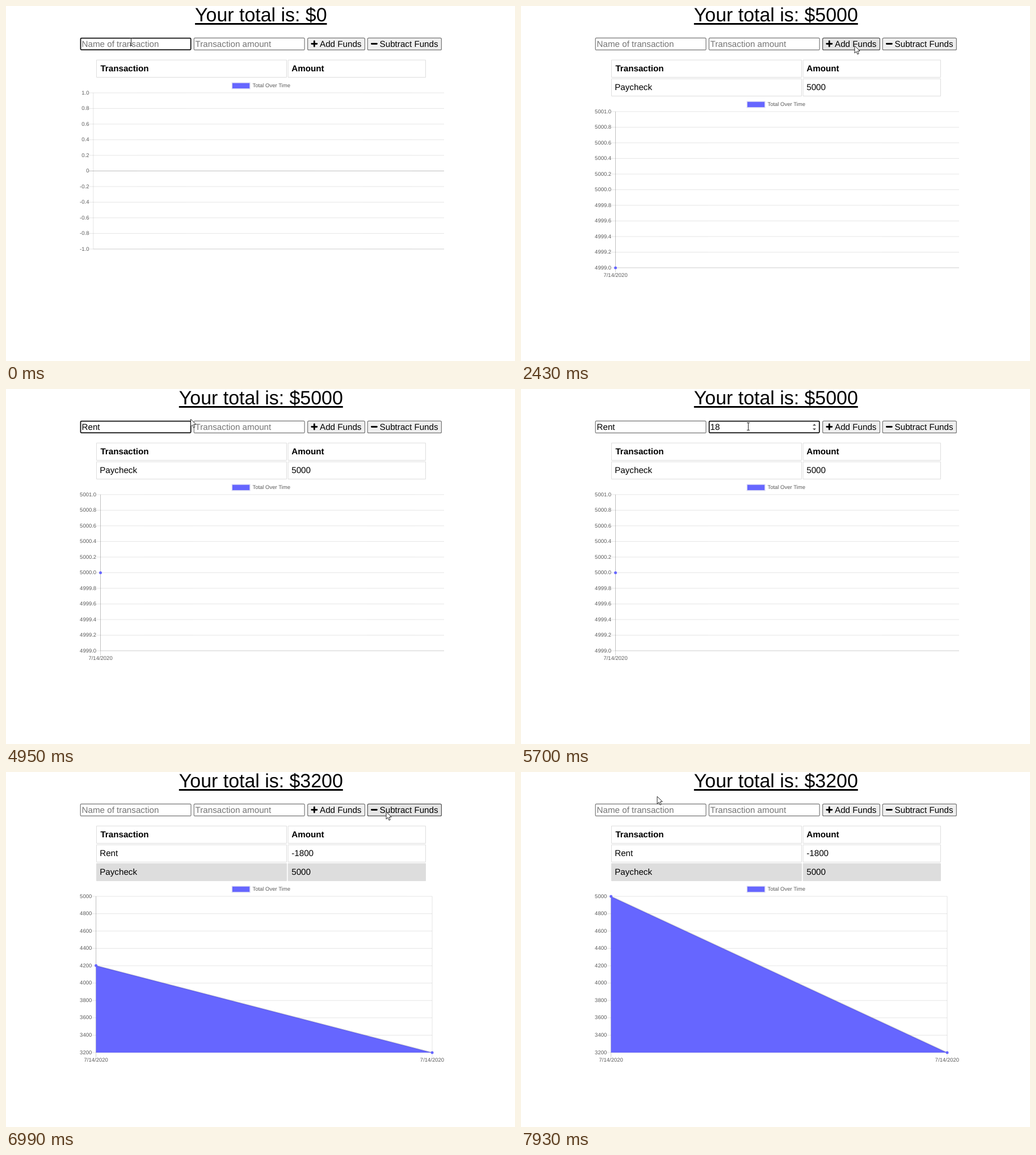
An HTML page with a canvas that plays this animation: 897 px wide and 625 px high, repeating every 8 s.

```html
<!DOCTYPE html>
<html lang="en">
<head>
<meta charset="utf-8">
<title>Budget tracker</title>
<style>
  html, body { margin: 0; width: 100%; height: 100%; overflow: hidden; background: #fff; }
  canvas { position: absolute; left: 0; top: 0; }
  h1 {
    position: absolute; left: .8px; top: -3px; width: 897px; margin: 0;
    font: 33.9px/38px "Liberation Sans", Arial, sans-serif; text-align: center;
    text-decoration: underline 2.5px; text-underline-offset: 3px;
    text-rendering: geometricPrecision; color: #000;
  }
</style>
</head>
<body>
<h1></h1>
<canvas width="897" height="625"></canvas>
<script>
const LOOP = 8000, HOLD = 158.5, KEY_TIME = 100;
const BLUE = '#6666ff', FAINT = 'rgba(0,0,0,.1)', DARK = 'rgba(0,0,0,.25)';
const FONT = '"Liberation Sans", Arial, sans-serif';
const title = document.querySelector('h1');
const ctx = document.querySelector('canvas').getContext('2d');

const entries = [
  { name: 'Paycheck', amount: 5000, focusAt: 0, nameAt: 100, amountAt: 900, click: 2430 },
  { name: 'Rent', amount: -1800, focusAt: 4180, nameAt: 4450, amountAt: 5440, click: 6830 }
];

// Pointer stops: time, x, y
const stops = [
  [0, 220, 63], [1160, 220, 63], [1420, 252, 50], [1800, 400, 84], [2280, 588, 70],
  [3230, 588, 70], [3480, 433, 76], [4180, 200, 68], [4910, 325, 53], [5400, 400, 66],
  [5860, 400, 66], [6650, 670, 70], [7140, 670, 70], [7760, 297, 36], [7920, 240, 43]
];

const clamp = u => Math.max(0, Math.min(1, u));
const typed = (word, from, t) => String(word).slice(0, Math.max(0, Math.floor((t - from) / KEY_TIME)));

function text(str, x, y, { size = 15.2, color = '#000', align = 'left', weight = '' } = {}) {
  ctx.font = `${weight} ${size}px ${FONT}`;
  ctx.textAlign = align;
  ctx.fillStyle = color;
  ctx.fillText(str, x, y);
}

const small = (str, x, y, align) => text(str, x, y, { size: 9.5, color: '#5c5c5c', align });

function line(x1, y1, x2, y2, color, width = 1) {
  ctx.strokeStyle = color;
  ctx.lineWidth = width;
  ctx.beginPath();
  ctx.moveTo(x1, y1);
  ctx.lineTo(x2, y2);
  ctx.stroke();
}

// Rectangle whose border lies inside the given edges
function box(x, y, w, h, fill, border, width = 1, radius = 0) {
  ctx.beginPath();
  ctx.roundRect(x + width / 2, y + width / 2, w - width, h - width, radius);
  ctx.fillStyle = fill;
  ctx.fill();
  ctx.strokeStyle = border;
  ctx.lineWidth = width;
  ctx.stroke();
}

function polygon(points, fill) {
  ctx.beginPath();
  points.forEach(([x, y]) => ctx.lineTo(x, y));
  ctx.closePath();
  ctx.fillStyle = fill;
  ctx.fill();
}

const isOver = (p, x, w) => p.x >= x && p.x <= x + w && p.y >= 56 && p.y <= 78;
const borderColor = hover => hover ? '#505050' : '#767676';

function field(x, value, hint, focused, hover) {
  box(x, 55.8, 196, 22.2, '#fff', focused ? '#101010' : borderColor(hover), focused ? 1.8 : 1.2, 1.5);
  text(value || hint, x + 2.9, 72, { color: value ? '#000' : '#757575' });
}

function spinner(x) {
  for (const dir of [-1, 1]) {
    const y = 67 + dir * 2.5;
    polygon([[x - 3, y], [x, y + dir * 3], [x + 3, y]], '#444');
  }
}

function button(x, w, label, isPlus, hover) {
  box(x, 55.8, w, 22.2, hover ? '#e5e5e5' : '#efefef', borderColor(hover), 1.2, 2);
  const mid = x + 12.3;
  ctx.lineCap = 'round';
  line(mid - 4.5, 66.5, mid + 4.5, 66.5, '#000', 2.8);
  if (isPlus) line(mid, 62, mid, 71, '#000', 2.8);
  ctx.lineCap = 'butt';
  text(label, x + 22, 72);
}

function table(rows) {
  [{ name: 'Transaction', amount: 'Amount' }, ...rows].forEach(({ name, amount }, i) => {
    const y = 94.6 + 33 * i, fill = i === 2 ? '#ddd' : '#fff';
    const style = { weight: i ? '' : 'bold' };
    box(159, y, 336, 31.5, fill, '#ddd');
    box(496.6, y, 243.4, 31.5, fill, '#ddd');
    text(name, i ? 165.2 : 166.4, y + 20.5, style);
    text(amount, 503.2, y + 20.5, style);
  });
}

function dot(x, y) {
  ctx.beginPath();
  ctx.arc(x, y, 2.5, 0, 7);
  ctx.fillStyle = BLUE;
  ctx.fill();
}

function chart(totals, age) {
  const several = totals.length > 1;
  const high = several ? Math.max(...totals) : (totals[0] || 0) + 1;
  const low = several ? Math.min(...totals) : high - 2;
  const step = several ? 200 : .2;
  const count = Math.round((high - low) / step) + 1;
  const labels = Array.from({ length: count }, (_, i) => {
    const value = high - i * step;
    return Math.abs(value) < .01 ? '0' : value.toFixed(several ? 0 : 1);
  });

  const top = 152.9 + 33 * totals.length, height = 275, bottom = top + height;
  ctx.font = `9.5px ${FONT}`;
  const left = 137.5 + Math.max(...labels.map(s => ctx.measureText(s).width));
  const right = several ? 751 : 772;
  box(397.6, top - 18.5, 33, 12, BLUE, '#d8d8f4', 1.4);
  small('Total Over Time', 434.4, top - 10);

  labels.forEach((label, i) => {
    const y = top + height * i / (count - 1);
    line(left - 8, y, right, y, label === '0' ? DARK : FAINT);
    small(label, left - 7.4, y + 2.6, 'right');
  });
  line(left, bottom, right, bottom, FAINT);
  line(left, top, left, bottom, FAINT);
  if (!totals.length) return;

  // Points rise from the baseline with a quartic ease-out over one second
  const rise = 1 - (1 - clamp(age / 1000)) ** 4;
  const points = totals.map((total, i) =>
    [i ? right : left, bottom - height * rise * (total - low) / (high - low)]);
  points.forEach(([x], i) => {
    line(x, top, x, bottom + 8, i ? FAINT : 'rgba(0,0,0,.18)');
    small('7/14/2020', x, bottom + 16.2, 'center');
  });
  if (several) {
    polygon([[left, bottom], ...points, [right, bottom]], BLUE);
    line(...points[0], ...points[1], FAINT, 2.4);
  }
  points.forEach(([x, y]) => dot(x, y));
}

function pointerAt(t) {
  const i = stops.findLastIndex(stop => stop[0] <= t);
  const [t0, x0, y0] = stops[i], [t1, x1, y1] = stops[i + 1] || [LOOP, x0, y0];
  const u = (t - t0) / (t1 - t0);
  return { x: x0 + (x1 - x0) * u, y: y0 + (y1 - y0) * u };
}

function drawPointer({ x, y }, beam) {
  ctx.save();
  ctx.translate(x, y);
  if (beam) {
    line(.5, -6, .5, 6, '#222');
    for (const end of [-6.5, 6.5]) line(-2, end, 3, end, '#333');
  } else {
    polygon([[0, 0], [0, 13], [3, 10.2], [5, 15], [7.2, 14], [5.2, 9.4], [9.2, 9.2]], '#fff');
    ctx.strokeStyle = '#111';
    ctx.lineWidth = .9;
    ctx.stroke();
  }
  ctx.restore();
}

function draw(t) {
  const held = Math.floor(t / HOLD) * HOLD; // motion is seen in short holds
  const done = entries.filter(e => t >= e.click);
  let sum = 0;
  const totals = done.map(e => sum += e.amount);
  const heading = 'Your total is: $' + sum;
  if (title.textContent !== heading) title.textContent = heading;

  const entry = entries.find(e => t >= e.focusAt && t < e.click);
  const name = entry ? typed(entry.name, entry.nameAt, t) : '';
  const amount = entry ? typed(Math.abs(entry.amount), entry.amountAt, t) : '';
  const onAmount = !!entry && t >= entry.amountAt;

  const p = pointerAt(held);
  const overName = isOver(p, 131, 195), overAmount = isOver(p, 331, 195);

  ctx.clearRect(0, 0, 897, 625);
  ctx.textRendering = 'geometricPrecision';
  field(130.6, name, 'Name of transaction', !!entry && !onAmount, overName);
  field(330.7, amount, 'Transaction amount', onAmount, overAmount);
  if (onAmount || overAmount) spinner(517);
  button(531, 102, 'Add Funds', true, isOver(p, 531, 102));
  button(636.6, 131.4, 'Subtract Funds', false, isOver(p, 637, 131));
  table([...done].reverse());
  chart(totals, done.length ? held - done.at(-1).click + 40 : 0);
  // The text beam lingers until the pointer first moves well away
  drawPointer(p, overName || overAmount || t < 1600);
}

const start = performance.now();
function loop() {
  draw((performance.now() - start) % LOOP);
  requestAnimationFrame(loop);
}
loop();
</script>
</body>
</html>
```
